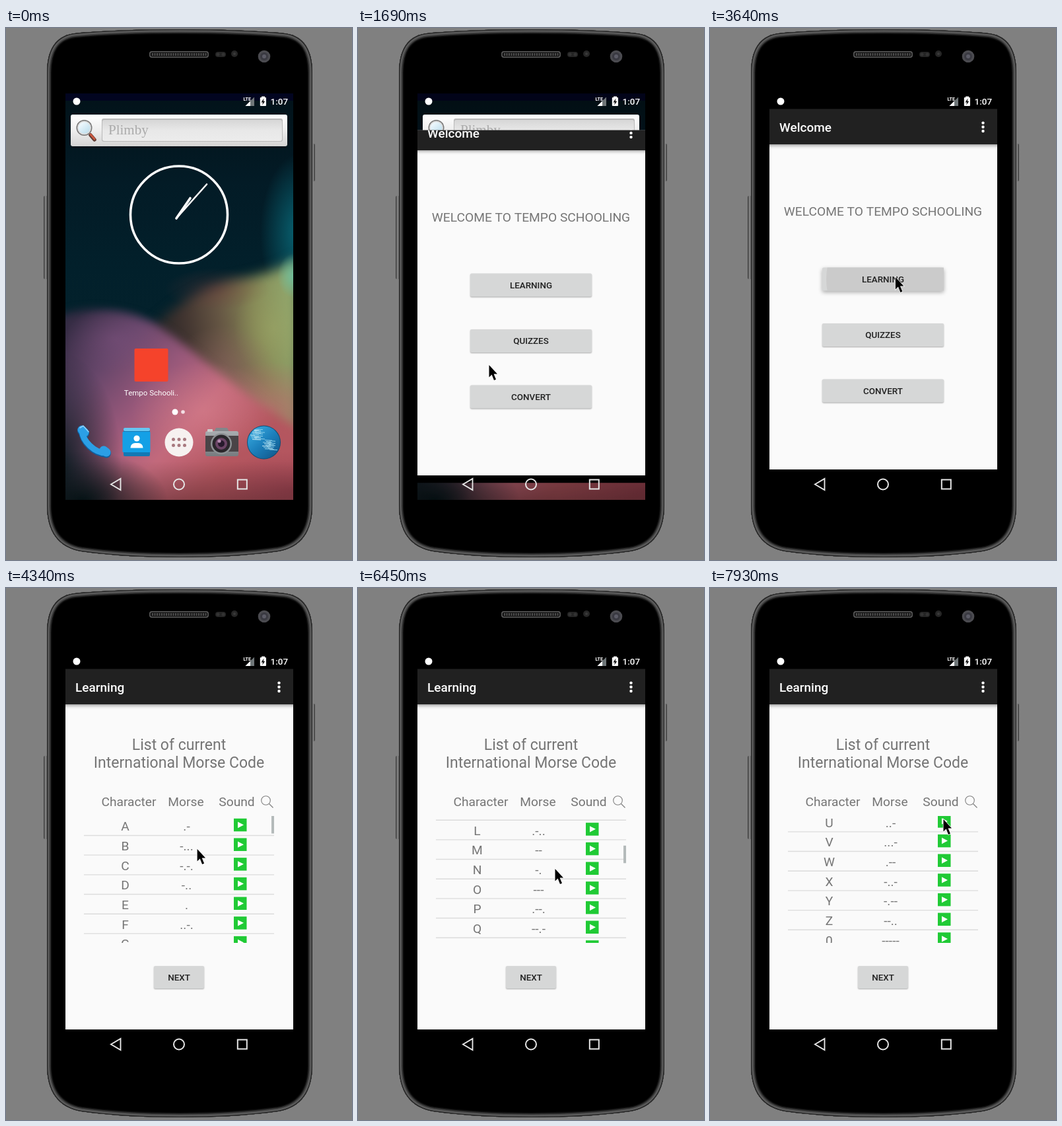
An HTML page with a canvas that plays this animation: 524 px wide and 805 px high, repeating every 8000 ms.

```html
<!DOCTYPE html>
<html lang="en">
<head>
<meta charset="utf-8">
<title>Phone demo</title>
<style>
html, body { margin: 0; width: 100%; height: 100%; overflow: hidden; background: #808080; }
canvas { display: block; }
</style>
</head>
<body>
<canvas id="stage" width="524" height="805"></canvas>
<script>
const W = 524, H = 805, LOOP = 8000;
const SCR = { x: 90, y: 99, w: 345, h: 615 };
const ROW = 29.67;
const SANS = 'Roboto, "Open Sans", sans-serif';
const stage = document.getElementById('stage').getContext('2d');
let c = stage;

// start, end, number of held steps
const BURSTS = [
  [300, 990, 10], [1460, 1920, 7], [2780, 3240, 7], [3390, 3940, 8], [4340, 4810, 7],
  [5130, 5900, 11], [5980, 6130, 3], [6300, 7080, 11], [7150, 7930, 11]
];
const POINTER = [
  [300, 420, 790], [530, 330, 650], [800, 225, 535], [990, 198, 510],
  [2703, 198, 510], [3240, 280, 377], [4262, 281, 377], [4810, 338, 503],
  [5053, 338, 503], [5130, 338, 492], [5284, 338, 422], [5438, 337, 316],
  [5515, 337, 330], [5900, 335, 471], [6130, 299, 523], [6222, 299, 523],
  [6300, 299, 505], [6456, 298, 425], [6612, 300, 300], [6690, 302, 279],
  [7080, 325, 338], [7300, 340, 338], [7850, 353, 350]
];
const SCROLL = [
  [5050, 0], [5130, 4], [5207, 28], [5284, 64], [5361, 112], [5438, 160], [5515, 194],
  [5592, 216], [5746, 235], [5830, 238], [6220, 238], [6300, 242], [6378, 272],
  [6456, 320], [6534, 382], [6612, 438], [6690, 482], [6846, 544], [7000, 580], [7230, 599]
];
const LETTERS = 'ABCDEFGHIJKLMNOPQRSTUVWXYZ0123';
const MORSE = ('.- -... -.-. -.. . ..-. --. .... .. .--- -.- .-.. -- -. --- .--. --.- .-. ... - ' +
  '..- ...- .-- -..- -.-- --.. ----- .---- ..--- ...--').split(' ');

const clamp = v => Math.max(0, Math.min(1, v));
const mix = (a, b, k) => a + (b - a) * k;

function held(t) {
  let out = 0;
  for (const [a, b, n] of BURSTS) {
    if (t < a - 1) break;
    const dt = (b - a) / (n - 1);
    out = a + dt * Math.min(n - 1, Math.floor((t - a + 8) / dt));
  }
  return out;
}

function track(keys, t) {
  if (t <= keys[0][0]) return keys[0].slice(1);
  for (let i = 1; i < keys.length; i++) {
    const a = keys[i - 1], b = keys[i];
    if (t <= b[0]) {
      const k = (t - a[0]) / (b[0] - a[0]);
      return a.slice(1).map((v, j) => mix(v, b[j + 1], k));
    }
  }
  return keys[keys.length - 1].slice(1);
}

function rect(x, y, w, h, fill, r = 0) {
  c.fillStyle = fill;
  c.beginPath();
  c.roundRect(x, y, w, h, r);
  c.fill();
}
function disc(x, y, r, fill) {
  c.fillStyle = fill;
  c.beginPath();
  c.arc(x, y, r, 0, Math.PI * 2);
  c.fill();
}
function ring(x, y, r, color, lw) {
  c.strokeStyle = color;
  c.lineWidth = lw;
  c.beginPath();
  c.arc(x, y, r, 0, Math.PI * 2);
  c.stroke();
}
function line(color, lw, ...p) {
  c.strokeStyle = color;
  c.lineWidth = lw;
  c.beginPath();
  for (let i = 0; i < p.length; i += 2) c.lineTo(p[i], p[i + 1]);
  c.stroke();
}
function poly(fill, ...p) {
  c.fillStyle = fill;
  c.beginPath();
  for (let i = 0; i < p.length; i += 2) c.lineTo(p[i], p[i + 1]);
  c.closePath();
  c.fill();
}
function text(s, x, y, size, color, weight = 400, align = 'center', family = SANS) {
  c.font = `${weight} ${size}px ${family}`;
  c.textAlign = align;
  c.fillStyle = color;
  c.fillText(s, x, y);
}
function grad(x0, y0, x1, y1, ...stops) {
  const g = c.createLinearGradient(x0, y0, x1, y1);
  stops.forEach((s, i) => g.addColorStop(i / (stops.length - 1), s));
  return g;
}
function shadowed(blur, dy, alpha, draw) {
  c.save();
  c.shadowColor = `rgba(0,0,0,${alpha})`;
  c.shadowBlur = blur;
  c.shadowOffsetY = dy;
  draw();
  c.restore();
}
function clipped(x, y, w, h, draw) {
  c.save();
  c.beginPath();
  c.rect(x, y, w, h);
  c.clip();
  draw();
  c.restore();
}
function layer(draw) {
  const cv = document.createElement('canvas');
  cv.width = W;
  cv.height = H;
  const prev = c;
  c = cv.getContext('2d');
  draw();
  c = prev;
  return cv;
}

function drawPhone() {
  rect(0, 0, W, H, '#808080');
  rect(57, 254, 7, 126, grad(57, 0, 63, 0, '#333', '#8a8a8a', '#444'), 2);
  rect(462, 175, 6, 57, grad(462, 0, 468, 0, '#444', '#8a8a8a', '#333'), 2);
  const body = new Path2D('M62 68C62 34 74 12 104 8C158 3 212 2 263 2S368 3 422 8' +
    'C452 12 464 34 464 68V722C464 762 447 786 412 792C362 799 312 801 263 801' +
    'S164 799 114 792C79 786 62 762 62 722Z');
  c.fillStyle = '#000';
  c.fill(body);
  c.save();
  c.clip(body);
  for (const [lw, color] of [[15, '#0c0c0c'], [12, '#2c2c2c'], [9, '#4a4a4a'], [6, '#5e5e5e'], [2.6, '#242424']]) {
    c.lineWidth = lw;
    c.strokeStyle = color;
    c.stroke(body);
  }
  c.restore();
  rect(217, 35, 90, 10, '#5a5a5a', 4);
  rect(218.5, 36.5, 87, 7, '#151515', 3);
  for (let x = 221; x < 304; x += 3.5) rect(x, 38, 2, 4, '#4c4c4c');
  rect(317, 36, 16, 8, '#242424', 4);
  disc(321, 40, 2.5, '#333');
  disc(329, 40, 2.5, '#333');
  disc(346, 39, 5, '#262626');
  disc(346, 39, 2, '#3a3a3a');
  disc(391, 43, 9.3, '#4b4b50');
  disc(391, 43, 6, '#3a3a42');
  disc(391, 43, 3, '#5b5b66');
}

function glow(x, y, rx, ry, color) {
  c.save();
  c.translate(x, y);
  c.scale(rx, ry);
  const g = c.createRadialGradient(0, 0, 0, 0, 0, 1);
  g.addColorStop(0, color);
  g.addColorStop(1, color.slice(0, 7) + '00');
  c.fillStyle = g;
  c.fillRect(-1, -1, 2, 2);
  c.restore();
}
function softShape(d, fill, blur) {
  c.save();
  c.filter = `blur(${blur}px)`;
  c.fillStyle = fill;
  c.fill(new Path2D(d));
  c.restore();
}
function drawWallpaper() {
  clipped(SCR.x, SCR.y, SCR.w, SCR.h, () => {
    rect(90, 99, 345, 615, grad(0, 99, 0, 500, '#021219', '#031b26', '#02202b', '#04222c'));
    rect(90, 99, 345, 11, '#020520');
    glow(445, 310, 60, 120, '#0a7080dd');
    // fan on the right
    softShape('M198 478Q262 402 345 382Q400 374 445 348V660H300Z',
      grad(215, 460, 435, 425, '#1f2426', '#40332f', '#665644', '#858855', '#8fa66c'), 9);
    glow(320, 395, 80, 32, '#6a383866');
    glow(405, 455, 60, 75, '#a0aa6877');
    glow(437, 375, 26, 34, '#6cc4a4dd');
    glow(330, 520, 80, 70, '#94686488');
    glow(400, 580, 110, 75, '#bc6c70bb');
    // mound on the left
    softShape('M80 436C120 420 182 424 226 448C290 488 375 575 455 610V730H80Z',
      grad(95, 450, 330, 660, '#352c44', '#66466a', '#98587a', '#c46a7c', '#b4565f'), 7);
    glow(300, 580, 110, 75, '#dc849077');
    glow(165, 470, 75, 50, '#80538077');
    glow(435, 700, 130, 60, '#8e384899');
    glow(80, 660, 95, 170, '#0d1c22ff');
    glow(115, 715, 130, 75, '#07191dff');
    rect(90, 655, 345, 59, grad(0, 655, 0, 714, '#00000000', '#00000044'));
  });
}

function drawHome() {
  shadowed(3, 1, 0.5, () => rect(98, 131, 328, 48, grad(0, 131, 0, 179, '#fff', '#eee', '#d4d4d4'), 3));
  rect(145, 137, 274, 35, '#b9b9b9', 3);
  rect(146, 139, 272, 32, grad(0, 139, 0, 171, '#d6d6d6', '#e8e8e8', '#ececec'), 3);
  text('Plimby', 155, 161, 21, '#aaa', 400, 'left', '"Liberation Serif", serif');
  c.lineCap = 'round';
  line('#5b3a32', 5.5, 128, 162, 134, 169);
  line('#c9573f', 3, 128, 161, 134, 168);
  disc(118.5, 151, 12, '#777');
  disc(118.5, 151, 10.5, '#ddd');
  disc(118.5, 151, 8.8, grad(112, 143, 126, 160, '#f4fbff', '#b9dcec'));

  ring(262, 282.5, 73.5, '#fff', 3.6);
  line('#fff', 2.6, 258, 288, 304, 236.5);
  line('#fff', 3.6, 258, 288, 279, 257.5);
  c.lineCap = 'butt';

  rect(194.5, 485, 51, 50, '#f5432b', 2);
  text('Tempo Schooli..', 220, 555.5, 11.5, '#fff');
  disc(256, 581, 4.5, '#fff');
  disc(268, 581, 2.8, '#f3dfe4');

  // handset
  c.lineCap = 'round';
  c.lineJoin = 'round';
  for (const [lw, off, color] of [[10, 1.5, '#0f5f9e'], [9, 0, '#2b9fe6']]) {
    c.save();
    c.translate(0, off);
    c.strokeStyle = color;
    c.lineWidth = lw;
    c.stroke(new Path2D('M115 609C116 625 134 643 151 643'));
    line(color, lw + 4, 115, 608, 119, 612);
    line(color, lw + 4, 148, 639, 152, 642);
    c.restore();
  }
  line('#8fd2fb', 1.5, 112, 605, 117, 602, 125, 611);
  c.lineCap = 'butt';
  c.lineJoin = 'miter';

  // contacts
  rect(178, 605, 40, 43, '#1378b4', 2);
  rect(178, 605, 40, 5, '#67c6f2', 2);
  rect(176.5, 611, 42, 31, '#14a0e6', 1);
  disc(198, 621, 4.6, '#fff');
  rect(188.5, 628, 19, 7.5, '#fff', [7, 7, 0, 0]);

  disc(262, 627, 21.5, '#f6f1f0');
  for (let i = 0; i < 6; i++) disc(253.5 + (i % 3) * 8.5, 622.5 + Math.floor(i / 3) * 9, 2.5, '#a8797f');

  // camera
  poly('#82868a', 314, 613, 318, 605, 335, 605, 339, 613);
  rect(302, 610, 50, 38, grad(0, 610, 0, 648, '#a9adb0', '#777b7f'), 3);
  rect(302, 617, 50, 24, '#4a4447');
  rect(305, 607, 8, 4, '#ccc', 1);
  disc(326, 629, 16, '#8d9194');
  disc(326, 629, 13.5, '#2a262b');
  disc(326, 629, 9, '#6b4566');
  disc(326, 629, 5, '#27192c');
  disc(323, 625, 2.6, '#b58bb0');

  // globe
  disc(390.5, 627, 25.5, '#0d4c74');
  disc(390.5, 627, 24.5, grad(372, 606, 408, 648, '#37a8de', '#1c80bc', '#125c90'));
  c.save();
  c.beginPath();
  c.arc(390.5, 627, 24, 0, Math.PI * 2);
  c.clip();
  for (let i = 0; i < 30; i++) {
    const y = 606 + i * 1.1, x = i < 16 ? 370 + (i * 5) % 9 : 388 + (i * 7) % 12;
    line(i % 3 ? '#8fd0ea' : '#c4e8f4', 1, x, y, x + 7 + (i * 7) % 9, y + 0.6);
  }
  c.restore();
}

function drawStatus() {
  disc(107, 111, 5.5, '#fff');
  text('LTE', 359.5, 110, 7, '#fff', 700, 'left');
  poly('#6f7678', 376, 104.5, 376, 118, 362.5, 118);
  poly('#fff', 370, 110.5, 370, 118, 362.5, 118);
  rect(387, 103.5, 5, 3, '#fff');
  rect(384.8, 105, 9.2, 13, '#fff', 1);
  poly('#111', 390.5, 106.5, 386.5, 112.5, 389, 112.5, 388.3, 116.5, 392.3, 110.7, 389.8, 110.7);
  text('1:07', 427, 116, 13.4, '#fff', 500, 'right');
}
function drawNav() {
  line('#e6e6e6', 1.9, 173.5, 682, 173.5, 699, 159, 690.5, 173.5, 682, 173.5, 690);
  ring(262, 690.5, 8, '#e6e6e6', 2);
  c.strokeRect(350.8, 683.5, 14, 14);
}

function button(label, x, y, w, h, press = 0) {
  shadowed(2 + press * 4, 1 + press * 1.5, 0.32, () => rect(x, y, w, h, '#d6d7d7', 2));
  if (press) clipped(x, y, w, h, () => disc(280, 380, 104 * press, '#cbcbcb'));
  text(label, x + w / 2, Math.floor(y + h / 2 + 5), 13.4, '#212121', 500);
}

function drawWindow(title, content) {
  rect(SCR.x, SCR.y, SCR.w, SCR.h, '#000');
  rect(90, 122, 345, 546, '#fafafa');
  clipped(90, 122, 345, 70, () => shadowed(5, 2, 0.4, () => rect(85, 116, 355, 60, '#212121')));
  rect(90, 118, 345, 4.5, '#000');
  text(title, 105, 157, 19, '#fff', 500, 'left');
  for (let i = 0; i < 3; i++) disc(413.5, 143.6 + i * 6.2, 2.2, '#fff');
  content();
}

function drawWelcome(t) {
  drawWindow('Welcome', () => {
    text('WELCOME TO TEMPO SCHOOLING', 262, 284, 19.2, '#757575');
    const press = t < 3389 ? 0 : clamp((t - 3330) / 296);
    button('LEARNING', 170, 362.5, 184, 35, press);
    button('QUIZZES', 170, 447, 184, 35);
    button('CONVERT', 170, 531.5, 184, 35);
  });
}

function drawLearning(t) {
  const [scroll] = track(SCROLL, t);
  const gray = '#757575';
  drawWindow('Learning', () => {
    text('List of current', 262, 245, 23, gray);
    text('International Morse Code', 262, 272, 23, gray);
    text('Character', 186, 330, 19.2, gray);
    text('Morse', 272.5, 330, 19.2, gray);
    text('Sound', 349.5, 330, 19.2, gray);
    ring(393.5, 321.5, 6.8, '#808080', 1.1);
    line('#808080', 1.3, 398.5, 326.5, 404.5, 332.5);
    clipped(118, 345, 288, 192, () => {
      for (let i = 0; i < LETTERS.length; i++) {
        const y = 360 + i * ROW - scroll;
        if (y < 320 || y > 570) continue;
        text(LETTERS[i], 180.5, y + 7.3, 19.2, gray);
        text(MORSE[i], 273.5, y + 7.3, 19.2, gray);
        rect(345, y - 11.2, 19.5, 19.5, '#20ca35');
        poly('#fff', 351, y - 6.2, 360, y - 1.5, 351, y + 3.2);
        rect(118, y + 13.8, 288, 1.4, '#dcdcdc');
      }
      c.globalAlpha *= 1 - clamp((t - 7500) / 250);
      rect(402, 345 + scroll * 0.14, 4, 26.5, '#b4baba');
    });
    button('NEXT', 224, 572, 76, 34);
  });
}

function drawPointer(t) {
  if (t < 299) return;
  const [x, y] = track(POINTER, t);
  c.save();
  c.translate(x, y);
  const arrow = new Path2D('M0.5 0V18.5L4.6 14.6L8 23L11 21.8L7.6 13.6H13Z');
  c.strokeStyle = '#fff';
  c.lineWidth = 1.4;
  c.stroke(arrow);
  c.fillStyle = '#000';
  c.fill(arrow);
  c.restore();
}

const phone = layer(drawPhone), wallpaper = layer(drawWallpaper), home = layer(drawHome);

function render(time) {
  const t = held(time);
  c.drawImage(phone, 0, 0);
  clipped(SCR.x, SCR.y, SCR.w, SCR.h, () => {
    if (t < 1919) {
      const p = t < 1459 ? 0 : clamp((t - 1430) / 490);
      const e = 1 - Math.pow(1 - p, 2.56);
      c.drawImage(wallpaper, 0, 0);
      rect(SCR.x, SCR.y, SCR.w, SCR.h, `rgba(0,0,0,${0.25 * e})`);
      c.drawImage(home, 0, 0);
      if (p) {
        const side = clamp(e * 1.2);
        const x = mix(195, 90, side), r = mix(245, 435, side);
        const y = mix(485, 99, e), b = mix(535, 714, e);
        clipped(x, y, r - x, b - y, () => {
          c.globalAlpha = clamp(p * 3);
          c.translate(0, 63 * (1 - e));
          drawWelcome(t);
        });
      }
    } else {
      if (t < 3939) drawWelcome(t);
      if (t > 3660) {
        c.save();
        c.globalAlpha = clamp((t - 3650) / 200);
        c.translate(0, 49 * Math.pow(1 - clamp((t - 3650) / 350), 5) * (t < 3939));
        drawLearning(t);
        c.restore();
      }
    }
    drawStatus();
    drawNav();
  });
  drawPointer(t);
}

let start = null;
function tick() {
  const now = performance.now();
  if (start === null) start = now;
  render((now - start) % LOOP);
  requestAnimationFrame(tick);
}
tick();
</script>
</body>
</html>
```
